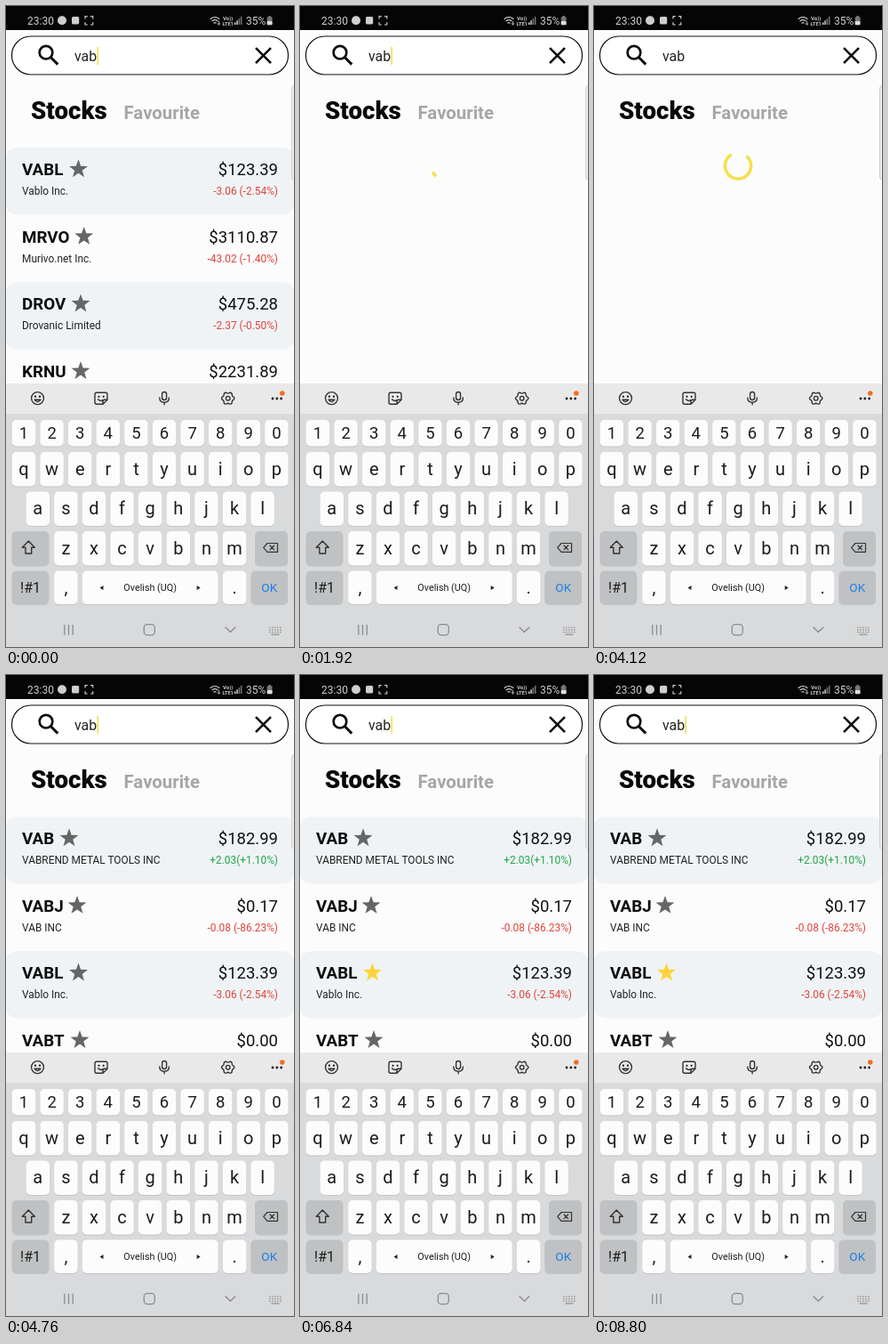
An HTML page that plays this animation: 324 px wide and 720 px high, repeating every 8.84 s.

```html
<!DOCTYPE html>
<html lang="en">
<head>
<meta charset="utf-8">
<title>Stock search</title>
<style>
  html, body { margin: 0; width: 100%; height: 100%; overflow: hidden; background: #fcfcfc; }
  svg { display: block; width: 324px; height: 720px; font-family: Roboto, sans-serif; }
  .line { fill: none; stroke: #333; stroke-width: 1.4; stroke-linecap: round; stroke-linejoin: round; }
  .ticker { font-size: 18.8px; font-weight: 700; fill: #0c0c0c; }
  .price { font-size: 18.5px; fill: #111; text-anchor: end; }
  .company { font-size: 11.9px; fill: #222; }
  .change { font-size: 11.9px; text-anchor: end; }
  .key { text-anchor: middle; fill: #1c1c1c; }
  .status { font-size: 12px; fill: #cfcfcf; }
</style>
</head>
<body>
<svg id="stage" viewBox="0 0 324 720"></svg>
<script>
const LOOP = 8840;
const SEARCH_START = 800, RESULTS_AT = 4360, STARRED_AT = 5960;
const RED = '#e2433d', GREEN = '#22a648';

const text = (x, y, s, attrs = '') => `<text x="${x}" y="${y}" ${attrs}>${s}</text>`;
const rect = (x, y, w, h, fill, r = 0, attrs = '') =>
  `<rect x="${x}" y="${y}" width="${w}" height="${h}" rx="${r}" fill="${fill}" ${attrs}/>`;
const circle = (x, y, r, attrs = '') => `<circle cx="${x}" cy="${y}" r="${r}" ${attrs}/>`;
const line = (d, attrs = '') => `<path class="line" d="${d}" ${attrs}/>`;
const polar = (cx, cy, r, a) => `${(cx + r * Math.cos(a)).toFixed(2)},${(cy + r * Math.sin(a)).toFixed(2)}`;
const ring = (n, point) => Array.from({ length: n }, (_, i) => point(i)).join(' ');

function star(cx, cy, id) {
  const points = ring(10, i => polar(cx, cy + 0.8, i % 2 ? 4.5 : 11, (i / 5 - 0.5) * Math.PI));
  return `<polygon id="${id}" points="${points}" fill="#666"/>`;
}

function list(id, rows) {
  return `<g id="${id}">` + rows.map(([ticker, starX, company, price, change], i) => {
    const y = 159 + 75.6 * i;
    const color = change[0] === '+' ? GREEN : RED;
    return (i % 2 ? '' : rect(-1, y, 326, 75.5, '#eff3f5', 14)) +
      text(18, y + 31, ticker, 'class="ticker"') +
      star(starX, y + 23.5, `${id}-star${i}`) +
      text(18, y + 53, company, 'class="company"') +
      text(306, y + 31, price, 'class="price"') +
      text(306, y + 53, change, `class="change" fill="${color}"`);
  }).join('') + '</g>';
}

function statusBar() {
  const grey = 'fill="#cfcfcf"';
  const stroke = 'style="stroke:#cfcfcf;stroke-width:1.2"';
  const bars = [0, 1, 2, 3].map(i =>
    rect(257 + i * 2.3, 18.5 - i * 2.2, 1.5, 2.5 + i * 2.2, i < 2 ? '#cfcfcf' : '#777')).join('');
  return rect(0, 0, 324, 27, '#050505') +
    text(24, 20.7, '23:30', 'class="status"') +
    circle(63, 16.3, 5, grey) + rect(74, 12, 8.2, 8.6, '#cfcfcf', 1.5) +
    line('M89 14v-2.3h2.3M95.5 11.7h2.3V14M97.8 18.7V21h-2.3M91.3 21H89v-2.3', stroke) +
    `<g id="record">${line('M91.5 15v2.8M95.3 15v2.8M91.5 14.5h3.8M91.5 18.2h3.8', stroke)}</g>` +
    line('M230 14.5q5-4 10 0M232 16.8q3-2.4 6 0M234 19q1-.9 2 0', stroke) +
    line('M239.5 17v4m-1.2-1.2l1.2 1.4 1.2-1.4', stroke + ' opacity=".7"') +
    text(244, 15.8, 'Vo))', 'font-size="6" font-weight="700" ' + grey) +
    text(243.5, 21.5, 'LTE1', 'font-size="5.6" font-weight="700" ' + grey) +
    bars + text(270, 20.7, '35%', 'class="status"') +
    rect(295.3, 11, 2.6, 2, '#777') + rect(293.7, 12.3, 5.8, 9, '#777', 1) + rect(293.7, 17, 5.8, 4.3, '#ddd', 1);
}

function header() {
  return rect(6.5, 34, 311, 43, '#fff', 21.5, 'stroke="#111" stroke-width="1.2"') +
    circle(45, 52.2, 7.3, 'fill="none" stroke="#0c0c0c" stroke-width="2.7"') +
    line('M50.5 57.8L58.3 65.6', 'style="stroke:#0c0c0c;stroke-width:3;stroke-linecap:butt"') +
    line('M281 47.2L298 64.2M298 47.2L281 64.2', 'style="stroke:#0c0c0c;stroke-width:2.6;stroke-linecap:butt"') +
    text(77, 61.5, 'vab', 'font-size="15.9" fill="#222"') +
    rect(102.4, 46, 1.5, 20, '#e9e04c', 0, 'id="caret"') +
    text(28, 126.7, 'Stocks', 'font-size="27.7" font-weight="800" fill="#080808"') +
    text(132.5, 126.5, 'Favourite', 'font-size="20.4" font-weight="700" fill="#a6a6a6"');
}

function key(x, y, w, h, label = '', size = 20, fill = '#fcfcfc', color = '#1c1c1c') {
  return rect(x, y + 1, w, h, '#c2c4c6', 5) + rect(x, y, w, h, fill, 5) +
    text(x + w / 2, y + h / 2 + size * 0.33, label, `class="key" font-size="${size}" style="fill:${color}"`);
}

const keyRow = (labels, x, y, h, size) =>
  [...labels].map((c, i) => key(x + 31.6 * i, y, 26.4, h, c, size)).join('');

function toolbar() {
  const gear = ring(48, i => {
    const a = i * Math.PI / 24;
    return polar(249.7, 440.7, 6.4 + 0.8 * Math.cos(6 * a), a);
  });
  return rect(0, 424, 324, 34, '#e9e9e9') +
    circle(35.5, 440.6, 7, 'class="line"') + line('M32 442.2q3.5 4.6 7 0z') +
    circle(33, 438.7, 1.1) + circle(38, 438.7, 1.1) +
    line('M102 434.3h10q2 0 2 2v6l-5 5h-7q-2 0-2-2v-9q0-2 2-2zM114 442.3h-3q-2 0-2 2v3M103.5 441.7q3 3 5.5 .8') +
    circle(104.5, 438.7, 1) + circle(109.7, 438.7, 1) +
    rect(175.6, 433.5, 5, 9, 'none', 2.5, 'class="line"') +
    line('M172.8 440q0 5.2 5.3 5.2t5.3-5.2M178.1 445.2v2.6') +
    `<polygon class="line" points="${gear}"/>` + circle(249.7, 440.7, 2.3, 'class="line"') +
    [300, 304.8, 309.6].map(x => circle(x, 441, 1.4, 'fill="#222"')).join('') +
    circle(310.8, 435, 2.7, 'fill="#f56a1c"');
}

function keyboard() {
  const dark = '#bfc1c3';
  return rect(0, 457, 324, 263, '#d9dadc') + toolbar() +
    keyRow('1234567890', 6.8, 465, 29.5, 18.5) +
    keyRow('qwertyuiop', 6.8, 501, 38.5, 20) +
    keyRow('asdfghjkl', 22.6, 545.5, 38.5, 20) +
    keyRow('zxcvbnm', 54.2, 590, 38.5, 20) +
    key(6.8, 590, 41.5, 38.5, '', 16, dark) + key(280, 590, 37, 38.5, '', 16, dark) +
    line('M25.3 601l-7 7.3h3.6v6.7h6.8v-6.7h3.6z') +
    line('M294 603.5h11.5v9.8H294l-4.3-4.9zM297 606l4.6 4.6M301.6 606l-4.6 4.6', 'style="stroke-width:1.2"') +
    key(6.8, 634.5, 41.5, 37.5, '!#1', 16, dark) + key(54.2, 634.5, 26.4, 37.5, ',', 20) +
    key(85.7, 634.5, 153, 37.5, 'Ovelish (UQ)', 10.8) + key(244, 634.5, 26.4, 37.5, '.', 20) +
    key(275.5, 634.5, 41.5, 37.5, 'OK', 13.5, dark, '#1b7fe6') +
    '<path d="M109.5 651v5l-4-2.5zM214.7 651v5l4-2.5z" fill="#222"/>';
}

function navBar() {
  const grey = 'style="stroke:#8b8c8e;stroke-width:1.3"';
  const dots = ring(15, i => rect(296 + (i % 5) * 3, 697.5 + Math.floor(i / 5) * 2.6, 1.6, 1.4, '#999'));
  return line('M65.8 695.5v10.5M70.5 695.5v10.5M75.2 695.5v10.5', grey) +
    rect(155.3, 694.6, 12, 12, 'none', 3.5, 'class="line" ' + grey) +
    line('M247 698l5.4 5.3 5.4-5.3', grey) + dots + rect(298.5, 705.3, 9, 1.4, '#999');
}

const $ = id => document.getElementById(id);
$('stage').innerHTML = rect(0, 0, 324, 720, '#fcfcfc') + header() +
  list('market', [
    ['VABL', 81.5, 'Vablo Inc.', '$123.39', '-3.06 (-2.54%)'],
    ['MRVO', 87.7, 'Murivo.net Inc.', '$3110.87', '-43.02 (-1.40%)'],
    ['DROV', 84, 'Drovanic Limited', '$475.28', '-2.37 (-0.50%)'],
    ['KRNU', 84, '', '$2231.89', '']]) +
  list('results', [
    ['VAB', 71, 'VABREND METAL TOOLS INC', '$182.99', '+2.03(+1.10%)'],
    ['VABJ', 80, 'VAB INC', '$0.17', '-0.08 (-86.23%)'],
    ['VABL', 81.5, 'Vablo Inc.', '$123.39', '-3.06 (-2.54%)'],
    ['VABT', 83, '', '$0.00', '']]) +
  '<path id="spinner" fill="none" stroke="#f3e04e" stroke-width="3.6"/>' +
  rect(321.5, 89.5, 6, 105.5, '#ededed', 3, 'stroke="#cfcfcf"') +
  statusBar() + keyboard() + navBar();

// Cubic-bezier(.4, 0, .2, 1), solved by bisection.
function ease(x) {
  let lo = 0, hi = 1, u = 0.5;
  for (let i = 0; i < 20; i++) {
    u = (lo + hi) / 2;
    const bx = 1.2 * u * (1 - u) ** 2 + 0.6 * u * u * (1 - u) + u ** 3;
    if (bx < x) lo = u; else hi = u;
  }
  return 3 * u * u * (1 - u) + u ** 3;
}

// The arc grows for half a cycle, then its tail catches up while the ring turns.
function spinnerPath(ms) {
  const cycle = Math.floor(ms / 1333), p = ms / 1333 - cycle;
  const turn = 82 + 272 * cycle + 275 * p;
  const tail = 284 * (p > 0.5 ? ease(2 * p - 1) : 0);
  const head = 284 * (p < 0.5 ? ease(2 * p) : 1) + 4;
  const at = deg => polar(162, 179.5, 14.6, (turn + deg - 90) * Math.PI / 180);
  return `M${at(tail)}A14.6 14.6 0 ${head - tail > 180 ? 1 : 0} 1 ${at(head)}`;
}

const show = (id, on) => { $(id).style.display = on ? '' : 'none'; };

function draw() {
  const t = performance.now() % LOOP, beat = t % 1000;
  const searching = t >= SEARCH_START && t < RESULTS_AT;
  show('market', t < SEARCH_START);
  show('results', t >= RESULTS_AT);
  show('spinner', searching);
  show('caret', beat >= 520 || beat < 40);
  show('record', beat >= 200 && beat < 700);
  $('results-star2').setAttribute('fill', t >= STARRED_AT ? '#ffd43a' : '#666');
  if (searching) $('spinner').setAttribute('d', spinnerPath(t - SEARCH_START));
  requestAnimationFrame(draw);
}
draw();
</script>
</body>
</html>
```
